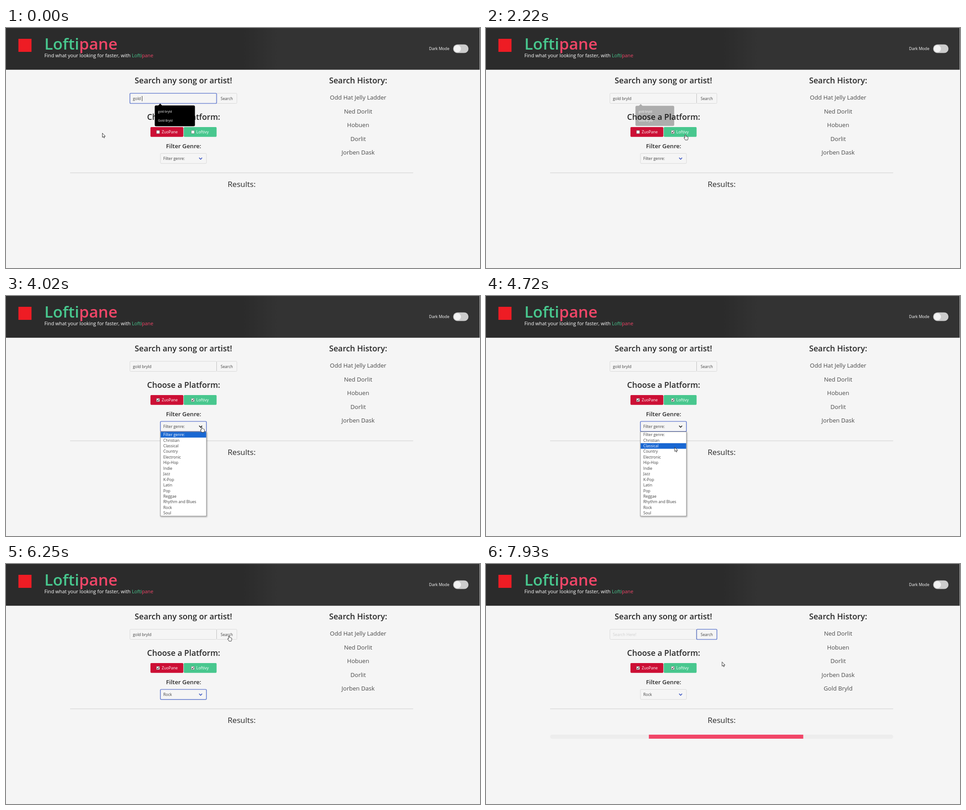
Animation, 1050 px wide and 533 px high, one loop 7.99 s. Source, as an HTML page:

```html
<!DOCTYPE html>
<html lang="en">
<head>
<meta charset="utf-8">
<title>Music search</title>
<style>
  html, body { margin: 0; width: 100%; height: 100%; overflow: hidden; background: #f5f5f5; }
  svg { display: block; width: 1050px; height: 533px; }
  text { font: 8.6px "Open Sans", "Noto Sans", sans-serif; fill: #404040; white-space: pre; }
  .mid text, text.mid { text-anchor: middle; }
  .head { font-size: 17.7px; font-weight: 600; fill: #282828; }
  .light { fill: #fff; }
  .green { fill: #48c78e; }
  .red { fill: #f14668; }
  #history text { font-size: 13.1px; fill: #4a4a4a; }
  #suggest text { font-size: 6.6px; fill: #fff; }
  .field { fill: none; stroke: #e2e2e2; mix-blend-mode: multiply; }
  .focus { fill: none; stroke: #6f85d1; stroke-width: 1.7; }
  .tick { fill: none; stroke: #222; stroke-width: 1.3; }
  #pointer path { fill: #fff; stroke: #222; stroke-width: .9; stroke-linejoin: round; }
</style>
</head>
<body>
<svg viewBox="0 0 1050 533">
  <defs>
    <linearGradient id="shade">
      <stop offset=".5" stop-color="#2b2b2b"/>
      <stop offset=".575" stop-color="#333"/>
    </linearGradient>
    <clipPath id="track"><rect x="142" y="379" width="760" height="9" rx="4.5"/></clipPath>
    <filter id="shadow" x="-10%" y="-10%" width="120%" height="120%">
      <feDropShadow dx="1" dy="1.5" stdDeviation="1.5" flood-opacity=".35"/>
    </filter>
  </defs>

  <rect width="1049.3" height="92.7" fill="url(#shade)"/>
  <rect x="27.5" y="24" width="29" height="29" fill="#ee1c24"/>
  <text x="85" y="48" style="font-size:35.2px;font-weight:600"><tspan class="green">Lofti</tspan><tspan class="red">pane</tspan></text>
  <text x="85" y="64.5" class="light" style="font-size:10.8px">Find what your looking for faster, with <tspan class="green">Lofti</tspan><tspan class="red">pane</tspan></text>
  <text x="937" y="49.3" class="light" style="font-size:8.75px">Dark Mode</text>
  <rect x="990.5" y="36.5" width="34" height="19" rx="9.5" fill="#ccc"/>
  <circle cx="1000" cy="46" r="7.8" fill="#f3f3f3"/>

  <g class="mid">
    <text class="head" x="393" y="122.5">Search any song or artist!</text>
    <text class="head" x="780" y="122.5">Search History:</text>
    <text class="head" x="393.5" y="204">Choose a Platform:</text>
    <text class="head" x="393.5" y="266.7" style="font-size:13.1px">Filter Genre:</text>
    <text class="head" x="522" y="353.3" style="font-size:17.2px;font-weight:500">Results:</text>
  </g>
  <g id="history" class="mid"></g>

  <rect id="submit" x="466.5" y="145" width="45" height="22.5" rx="2"/>
  <rect id="input" x="274.5" y="145" width="192" height="22.5" rx="2"/>
  <text class="mid" x="489" y="159.7">Search</text>
  <text id="query" x="281" y="159.9" style="font-size:8.8px"></text>
  <rect id="caret" y="151" width=".9" height="11.5" fill="#222"/>

  <rect x="320" y="220" width="72.8" height="21.7" rx="2" fill="#cc0f35"/>
  <rect x="393.7" y="220" width="72.8" height="21.7" rx="2" fill="#48c78e"/>
  <g fill="#fff" stroke="#666" stroke-width=".8">
    <rect x="333.3" y="227.6" width="7" height="7" rx="1"/>
    <rect x="410.4" y="227.6" width="7" height="7" rx="1"/>
  </g>
  <path id="tickA" class="tick" d="M334.8 231.2l1.5 1.6 2.7-3.5"/>
  <path id="tickB" class="tick" d="M411.9 231.2l1.5 1.6 2.7-3.5"/>
  <text x="345" y="234.2" class="light">ZuoPane</text>
  <text x="421.5" y="234.2" class="light" style="font-size:9px">Loftivy</text>

  <rect id="select" x="342" y="278.5" width="102" height="22.3" rx="2"/>
  <text id="genre" x="348.5" y="293"></text>
  <path id="chevron" d="M427.8 288.2l3.3 3.3 3.3-3.3" fill="none" stroke-width="1.7"/>

  <rect x="142" y="321" width="760" height="1.2" fill="#d4d4d4"/>
  <g id="progress" clip-path="url(#track)">
    <rect x="142" y="379" width="760" height="9" fill="#ededed"/>
    <path id="bar" class="red" d="M0 379h342v9h-342zm1140 0h342v9h-342z"/>
  </g>

  <g id="suggest">
    <path d="M336.5 173l5-5.2 5 5.2z"/>
    <rect x="329.5" y="172" width="89" height="46.3" rx="3"/>
    <text x="336.8" y="187.6">gold bryld</text>
    <text x="336.8" y="208.2">Gold Bryld</text>
  </g>

  <g id="menu">
    <rect x="342" y="301.5" width="102" height="187.3" fill="#fff" stroke="#808080" stroke-width=".9" filter="url(#shadow)"/>
    <rect id="mark" x="342.5" width="101" height="12.43" fill="#1967d2"/>
  </g>

  <g id="pointer">
    <path id="arrow" d="M0 0V9.4L2.1 7.5 3.5 10.7 5 10 3.7 7H6.6Z"/>
    <path id="hand" d="M-1 1Q0-.7 1 1V4.2Q2.2 3.6 2.7 4.6 4 4 4.4 5.1 5.8 4.7 6 6V9Q5.8 10.5 5 12.3H0Q-1.4 9.8-3 7.6-3.2 6-1 7.4Z"/>
  </g>
</svg>

<script>
const LOOP = 7990, ROW = 12.43, MENU_TOP = 302;
const genres = ["Filter genre:", "Christian", "Classical", "Country", "Electronic", "Hip-Hop", "Indie",
  "Jazz", "K-Pop", "Latin", "Pop", "Reggae", "Rhythm and Blues", "Rock", "Soul"];
const artists = ["Odd Hat Jelly Ladder", "Ned Dorlit", "Hobuen", "Dorlit", "Jorben Dask", "Gold Bryld"];
const keyTimes = [120, 270, 420, 730, 820];
const path = [[0, 213.5, 233.5], [1330, 213.5, 233.5], [1380, 213.5, 232.5], [1750, 320, 262], [1950, 410, 268],
  [2120, 441.5, 236.5], [2300, 441.5, 236.5], [2700, 352, 232], [2940, 349, 230], [3030, 349, 230],
  [3200, 435, 296], [3350, 435, 296], [3560, 433.5, 290.5], [4580, 433.5, 290.5], [5130, 373.5, 467.5],
  [5500, 373.5, 467.5], [6250, 494, 159], [6380, 490, 157], [6940, 490, 157], [7380, 559, 213],
  [7720, 530, 218], [7930, 523, 217.5], [LOOP, 521, 217.5]];
const hotspots = { submit: [467, 145, 512, 168], platform: [320, 220, 467, 242], select: [342, 278, 444, 301] };

const $ = id => document.getElementById(id);
const show = (id, on) => $(id).setAttribute("visibility", on ? "visible" : "hidden");
const style = (id, focused) => $(id).setAttribute("class", focused ? "focus" : "field");
const between = (t, a, b) => t >= a && t < b;

function addText(parent, x, y, text = "") {
  const node = document.createElementNS("http://www.w3.org/2000/svg", "text");
  node.setAttribute("x", x);
  node.setAttribute("y", y);
  node.textContent = text;
  parent.append(node);
  return node;
}
const history = Array.from({ length: 5 }, (_, i) => addText($("history"), 780, 158.9 + i * 30.6));
const options = genres.map((name, i) => addText($("menu"), 348.5, 311.2 + i * ROW, name));

function pointerAt(t) {
  const i = Math.max(1, path.findIndex(p => p[0] > t));
  const [t0, x0, y0] = path[i - 1], [t1, x1, y1] = path[i];
  const k = (t - t0) / (t1 - t0);
  return [x0 + (x1 - x0) * k, y0 + (y1 - y0) * k];
}

function draw(t) {
  const [x, y] = pointerAt(t);
  const over = name => {
    const [l, top, r, b] = hotspots[name];
    return between(x, l, r) && between(y, top, b);
  };
  const searched = t >= 6940, typing = t < 2150, open = between(t, 4020, 5500);

  // search field
  const typed = keyTimes.filter(k => t >= k).length;
  $("query").textContent = searched ? "Search Here!" : "gold bryld".slice(0, 5 + typed);
  $("query").style.fill = searched ? "#d0d0d0" : "";
  style("input", typing);
  style("submit", searched);
  show("caret", t < 1380 || between(t, 1880, 2150));
  if (typing) $("caret").setAttribute("x", 281 + $("query").getComputedTextLength());
  const fade = Math.min(1, Math.max(0, (t - 2150) / 100)), scale = 1 - fade * .05;
  $("suggest").setAttribute("opacity", 1 - fade);
  $("suggest").setAttribute("transform", `translate(374 195) scale(${scale}) translate(-374 -195)`);

  // platform and genre
  show("tickA", t >= 2800);
  show("tickB", t >= 2150);
  style("select", between(t, 4020, 6940));
  $("genre").textContent = genres[t < 5500 ? 0 : 13];
  $("chevron").setAttribute("stroke", open || over("select") ? "#222" : "#3f58c4");
  show("menu", open);
  const row = Math.max(0, Math.floor((y - MENU_TOP) / ROW));
  $("mark").setAttribute("y", MENU_TOP + row * ROW);
  options.forEach((o, i) => o.setAttribute("class", i === row ? "light" : ""));

  // history and loading bar
  history.forEach((h, i) => h.textContent = artists[i + searched]);
  show("progress", searched);
  const phase = (t - 6978) / 1480;
  $("bar").setAttribute("transform", `translate(${142 - 760 + 1520 * phase})`);

  const hand = Object.keys(hotspots).some(over);
  show("hand", hand);
  show("arrow", !hand);
  $("pointer").setAttribute("transform", `translate(${x} ${y})`);
}

function frame() {
  draw(performance.now() % LOOP);
  requestAnimationFrame(frame);
}
frame();
</script>
</body>
</html>
```
